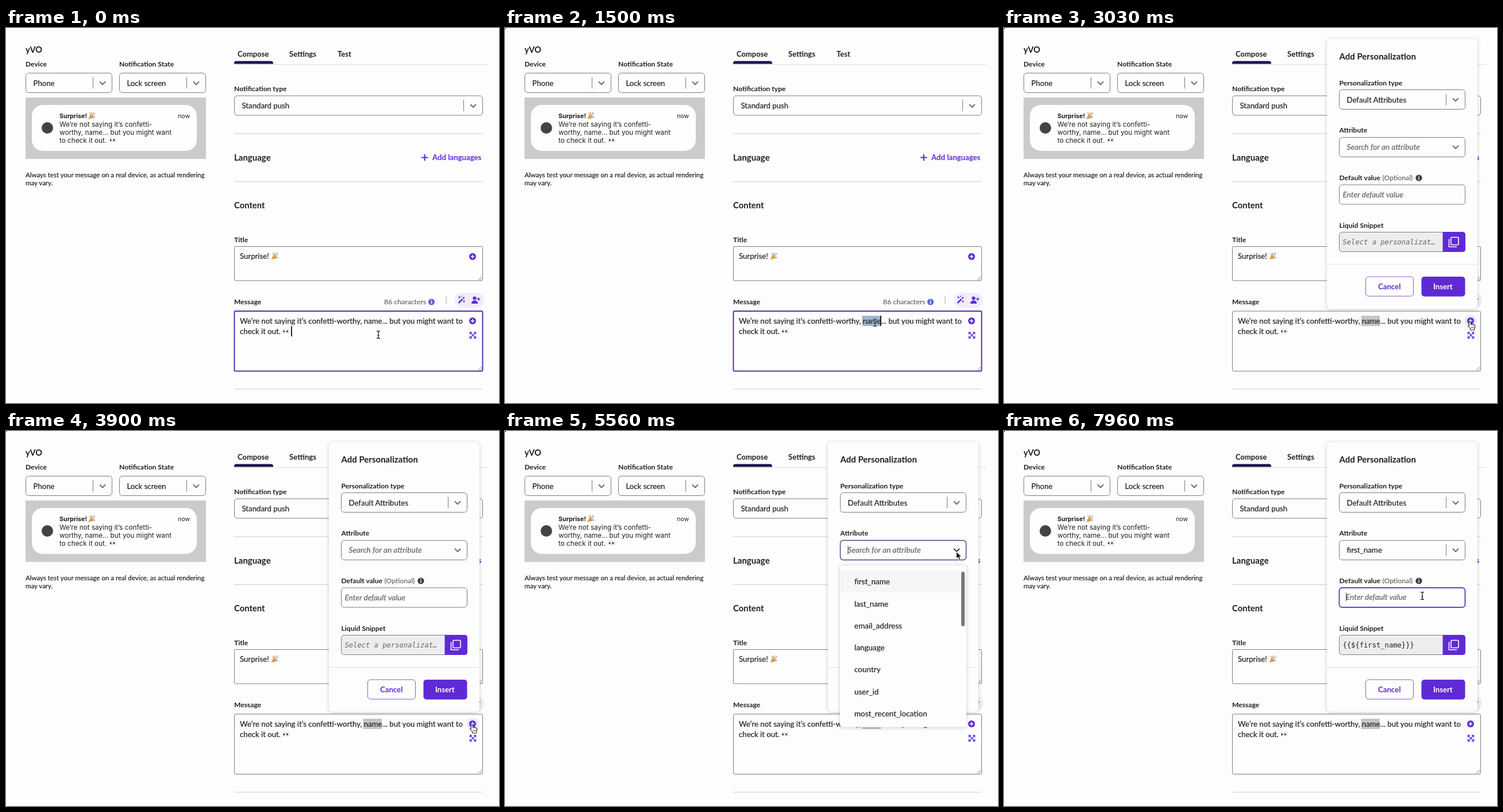
Write an HTML page that moves like this. It is 858 by 653 pixels and loops after 8000 ms.

```html
<!DOCTYPE html>
<html lang="en">
<head>
<meta charset="utf-8">
<title>Add personalization</title>
<style>
  html, body { margin: 0; width: 100%; height: 100%; overflow: hidden; background: #fdfdfd; }
  svg { display: block; width: 858px; height: 653px; font-family: Lato, sans-serif; }
  text { fill: #1f1f22; stroke: #1f1f22; stroke-width: .2; white-space: pre; }
  .b { font-weight: 700; stroke: none; }
  .i { font-style: italic; fill: #66666a; stroke: #66666a; }
  .soft { fill: #66666a; stroke: #66666a; }
  .accent { fill: #5f2ad6; }
  .sys { font-family: Inter, sans-serif; stroke: none; }
  .mono { font-family: "DejaVu Sans Mono", monospace; stroke: none; }
  .card { filter: drop-shadow(0 1px 3px rgba(0, 0, 0, .2)); }
</style>
</head>
<body>
<svg id="stage" viewBox="0 0 858 653"></svg>
<script>
const PURPLE = '#5f2ad6', GRAY = '#7c7c80', LOOP = 8000;

// Drawing helpers: text y is the visual middle of the line
const text = (x, y, s, size = 13.2, attrs = '') =>
  `<text x="${x}" y="${y + size * .35}" font-size="${size}" ${attrs}>${s}</text>`;
const bold = (x, y, s, size = 12.1, kind = '') => text(x, y, s, size, `class="b ${kind}"`);
const box = (x, y, w, h, r = 5, fill = '#fdfdfd', stroke = GRAY, attrs = '') =>
  `<rect x="${x}" y="${y}" width="${w}" height="${h}" rx="${r}" fill="${fill}" stroke="${stroke}" ${attrs}/>`;
const path = (d, stroke, width = 1, attrs = '') =>
  `<path d="${d}" fill="none" stroke="${stroke}" stroke-width="${width}" ${attrs}/>`;
const dot = (x, y, r, fill, attrs = '') => `<circle cx="${x}" cy="${y}" r="${r}" fill="${fill}" ${attrs}/>`;
const group = (id, body) => `<g id="${id}">${body}</g>`;
const chevron = (x, y, id = '') =>
  path(`M${x - 4.5} ${y - 2.2}l4.5 4.6 4.5 -4.6`, '#606065', 1.8, `stroke-linecap="round" ${id && `id="${id}"`}`);
const select = (x, y, w, value) => box(x, y, w, 34) + text(x + 13, y + 17.5, value) +
  path(`M${x + w - 33} ${y + 7}v20`, GRAY) + chevron(x + w - 16.5, y + 17.5);
const rule = y => path(`M397 ${y}H829.5`, '#cdcdd0');
const grip = (x, y) => path(`M${x - 7} ${y - 1}l6 -6M${x - 3.5} ${y - 1}l2.5 -2.5`, '#77777a', .9);
const plus = (x, y, id) => group(id, dot(x, y, 6, PURPLE) +
  path(`M${x - 3.2} ${y}h6.4M${x} ${y - 3.2}v6.4`, '#fff', 1.5));
const info = (x, y, fill) => dot(x, y, 5.6, fill) +
  path(`M${x} ${y - 3.4}v1.6M${x} ${y - .8}v4`, '#fff', 1.6);

const popper = (x, y) => `<g transform="translate(${x} ${y})">
  <path d="M-6 6L-2-3Q3-1 4 3Z" fill="#e3b052"/>
  ${path('M-4 2l4 3M-3 -1l6 5', '#a97a3c', .9)}
  ${path('M-1 -2q0 -3 2 -4M2 0q0 -3 4 -4', '#b56a77', 1.2)}
  ${path('M3 2q2 -1 3 1', '#6c8fb5', 1.2)}
  ${dot(-3, -5, .9, '#d08a5a')}${dot(4, -5.5, .9, '#7d9d60')}${dot(1, -3, .8, '#c7a24a')}</g>`;
const eyes = (x, y) => [-2.9, 2.9].map(d =>
  `<ellipse cx="${x + d}" cy="${y}" rx="2.6" ry="3.7" fill="#f3f3f3" stroke="#c6c6c6" stroke-width=".7"/>` +
  `<ellipse cx="${x + d - .9}" cy="${y + .3}" rx="1.3" ry="1.8" fill="#333"/>`).join('');

const preview =
  bold(34, 37.5, 'yVO', 14.6) + bold(34, 62.5, 'Device') + bold(197, 62.5, 'Notification State') +
  select(34.5, 78.5, 150, 'Phone') + select(197.5, 78.5, 150, 'Lock screen') +
  '<rect x="34" y="121" width="314" height="107" fill="#cbcbcd"/>' +
  '<rect x="45" y="134" width="287" height="80" rx="19" fill="#fefefe"/>' +
  dot(72, 174, 10, '#434347') +
  text(93, 153.5, 'Surprise!', 10.7, 'class="sys b"') + popper(149, 153) +
  text(299, 153.5, 'now', 10.6, 'class="sys"') +
  ['We’re not saying it’s confetti-', 'worthy, name... but you might want', 'to check it out.']
    .map((s, i) => text(93, 167.5 + 14 * i, s, 11.75, 'class="sys"')).join('') + eyes(186, 195) +
  text(34, 256, 'Always test your message on a real device, as actual rendering', 11.5) +
  text(34, 269.5, 'may vary.', 11.5);

const tools =
  '<rect x="781" y="461" width="51" height="26" rx="13" fill="#f1ecfb"/>' +
  path('M787.500 479l7 -7M795.500 471l2 -2', PURPLE, 2.6) +
  path('M789 467v4M787 469h4M793 466v2.600M797 474v4M795 476h4', PURPLE, 1.1) +
  dot(815.5, 470.5, 3.1, PURPLE) + `<path d="M810 480q0-5.500 5.500-5.500t5.500 5.500z" fill="${PURPLE}"/>` +
  path('M822.500 469v6M819.500 472h6', PURPLE, 1.4);
const expand = path('M808 530.500l9 9M817 530.500l-9 9', PURPLE, 1.3) +
  path('M807.500 533.500v-3.500h3.500M814 530h3.500v3.500M817.500 536.500v3.500h-3.500M811 540h-3.500v-3.500', PURPLE, 1.5);

const form =
  bold(403, 45.5, 'Compose', 13) + bold(493, 45.5, 'Settings', 13.2) + bold(577, 45.5, 'Test', 13) +
  path('M397 63.500H839', '#e0e0e3') + '<path d="M397 62.500v-1q0-4 4-4h60q4 0 4 4v1z" fill="#24124f"/>' +
  bold(397, 105.5, 'Notification type') + select(397.5, 118, 432, 'Standard push') + rule(184) +
  bold(397, 226, 'Language', 15) + path('M723 225.500h11.500M728.700 219.700v11.500', PURPLE, 2.1) +
  bold(742, 225.5, 'Add languages', 13.2, 'accent') + rule(267.5) +
  bold(397, 309, 'Content', 14.8) + bold(397, 368.5, 'Title') +
  box(397.5, 380.5, 432, 59.5, 2) + text(407, 397.5, 'Surprise!') + popper(467.5, 397.5) +
  plus(812, 398, 'titlePlus') + grip(829, 440) +
  bold(397, 477, 'Message') + text(658, 477, '86 characters', 12.3, 'class="soft"') +
  info(740.5, 477, '#5b66d0') + path('M766 466v15', '#aaaab0') + tools +
  box(397.5, 493, 432, 104.5, 2, '#fdfdfd', GRAY, 'id="message"') +
  '<rect id="selection" x="621.500" y="501" width="32.500" height="18"/>' +
  text(407, 510, 'We’re not saying it’s confetti-worthy, name... but you might want to') +
  text(407, 528, 'check it out.') + eyes(487.5, 528) + grip(829, 597) +
  dot(812, 510, 10.5, '#ece6f9', 'id="halo"') + plus(812, 510, 'messagePlus') + expand +
  '<rect id="caret" width="1.800" height="18" fill="#111"/>' + rule(629);

const modal = group('modal',
  box(562, 19, 262, 470, 6, '#fdfdfd', 'none', 'class="card"') +
  bold(583.5, 49.5, 'Add Personalization', 15) +
  bold(583.5, 95.5, 'Personalization type') + select(583.5, 107.5, 219, 'Default Attributes') +
  bold(583.5, 178, 'Attribute') +
  box(583.5, 190.5, 219, 34, 5, '#fdfdfd', GRAY, 'id="attribute"') +
  text(596.5, 207.5, 'Search for an attribute', 13.7, 'class="i" id="attributeHint"') +
  group('attributeValue', text(596.5, 207.5, 'first_name', 13.4) + path('M769.500 197.500v20', GRAY)) +
  chevron(786, 207.5, 'attributeChevron') +
  bold(583.5, 261, 'Default value') + text(658.5, 261, '(Optional)', 12.2, 'class="soft"') +
  info(722, 261, '#3b3b40') +
  box(583.5, 273, 219, 34, 5, '#fdfdfd', GRAY, 'id="fallback"') +
  text(0, 0, 'Enter default value', 13.6, 'class="i" id="fallbackHint"') +
  '<rect id="fieldCaret" width="1" height="15" fill="#444"/>' +
  bold(583.5, 343.5, 'Liquid Snippet') +
  box(583.5, 355.5, 215, 34, 5, '#ededee') +
  text(589.5, 373, 'Select a personalizat…', 12.15, 'class="mono i" id="snippetHint"') +
  text(589.5, 373, '{{${first_name}}}', 12.15, 'class="mono" id="snippet"') +
  `<path d="M763.500 355h34.500q5 0 5 5v25q0 5-5 5h-34.500z" fill="${PURPLE}"/>` +
  box(778, 364.5, 13, 13, 1, 'none', '#fff', 'stroke-width="1.600"') +
  path('M774.500 367.500v13.500h13.500', '#fff', 1.6) +
  path('M562 411.500H824', '#e3e3e6') +
  box(629.5, 433, 83, 34, 5, '#fdfdfd', '#8263c2') + bold(651, 450.5, 'Cancel', 13.2, 'accent') +
  box(726.5, 433, 76, 34.5, 5, PURPLE, 'none') +
  text(747, 450.5, 'Insert', 13.1, 'class="b" style="fill:#fff"'));

const options = ['first_name', 'last_name', 'email_address', 'language', 'country', 'user_id', 'most_recent_location'];
const dropdown = group('dropdown',
  box(583, 234, 220, 281.5, 4, '#fdfdfd', 'none', 'class="card"') +
  '<rect x="584" y="243" width="209" height="38.500" fill="#f6f6f7"/>' +
  options.map((s, i) => text(608, 262.5 + 38.3 * i, s, 13.5)).join('') +
  '<rect x="794" y="245" width="6" height="95" rx="3" fill="#77777a"/>');

const cursors =
  group('ibeam', ['#fff', '#222'].map((c, i) => path(
    'M-3 -6.500q3 0 3 2v9q0 2 -3 2M3 -6.500q-3 0 -3 2v9q0 2 3 2M-1.500 1.500h3', c, i ? 1.3 : 2.6)).join('')) +
  group('arrow', '<path d="M0 0V12.500L2.900 9.800 5 14.500 7.300 13.500 5.200 9H9Z" fill="#111" stroke="#fff" stroke-width=".9"/>') +
  group('hand', `<path d="M-1.500 1q1.500-2 3 0V5q2-1 2.500.5 2-.7 2.500.6 2-.4 2.200 1V10L7.500 13V15H1V13L-3 8.500q-.8-2 1.500-1.300Z"
    fill="#fff" stroke="#222" stroke-width="1.100"/>` + path('M2.500 9v3M4.500 9v3M6.300 9v3', '#222', .7));

const stage = document.getElementById('stage');
stage.innerHTML = preview + form + modal + dropdown + cursors +
  '<rect id="corner" width="1.500" height="1.500" fill="#222"/>';
const el = id => document.getElementById(id);
const show = (id, on) => el(id).setAttribute('visibility', on ? 'visible' : 'hidden');
const set = (id, attrs) => { for (const k in attrs) el(id).setAttribute(k, attrs[k]); };

const ease = {
  both: u => u * u * (3 - 2 * u),
  in: u => u * u,
  out: u => u * (2 - u)
};
// Pointer stops: time, x, y, easing of the move that ends there
const route = [
  [0, 648, 534], [250, 648, 534, 'both'], [900, 644, 513, 'both'], [1750, 644, 513, 'both'],
  [2450, 811, 511, 'both'], [4450, 811, 511, 'both'], [4830, 820, 349, 'in'], [5300, 785.5, 210, 'out'],
  [5800, 785.5, 210, 'both'], [6400, 742, 258, 'both'], [7050, 742, 258, 'both'],
  [7500, 728, 287, 'both'], [LOOP, 728, 287, 'both']
];
function pointerAt(t) {
  const i = route.findIndex(stop => stop[0] > t);
  const [t0, x0, y0] = route[i - 1], [t1, x1, y1, kind] = route[i];
  const u = ease[kind]((t - t0) / (t1 - t0));
  return [x0 + (x1 - x0) * u, y0 + (y1 - y0) * u];
}

const SELECT = 1200, OPEN = 2700, LIST = 5450, PICK = 6750, FOCUS = 7650;

function render(t) {
  const [x, y] = pointerAt(t);
  const selected = t >= SELECT, open = t >= OPEN, listed = t >= LIST && t < PICK;
  const picked = t >= PICK, typing = t >= FOCUS;
  show('corner', t >= 30);

  set('message', open ? { stroke: GRAY, 'stroke-width': 1 } : { stroke: '#5930ad', 'stroke-width': 2 });
  show('selection', selected);
  set('selection', { fill: open ? '#c3c6c8' : '#9ab7d2' });
  show('caret', !open && (selected ? (t - SELECT) % 1000 < 500 : t % 1000 < 500));
  set('caret', selected ? { x: 653, y: 501 } : { x: 496, y: 519 });
  const onPlus = t > 2300 && Math.hypot(x - 812, y - 510) < 12;
  show('halo', onPlus);
  set('messagePlus', { opacity: t > 4500 && t < 5050 ? .72 : 1 });

  show('modal', open);
  show('dropdown', listed);
  const attributeFocus = t >= LIST && !typing;
  const opening = t < LIST + 160;
  set('attribute', attributeFocus
    ? { stroke: opening ? '#4c3e86' : '#6a42c8', 'stroke-width': opening ? 1.4 : 2 }
    : { stroke: GRAY, 'stroke-width': 1 });
  set('attributeChevron', { stroke: attributeFocus ? '#2b2b30' : '#606065' });
  show('attributeHint', open && !picked);
  show('attributeValue', picked);
  show('snippetHint', open && !picked);
  show('snippet', picked);

  set('fallback', typing ? { stroke: '#6a42c8', 'stroke-width': 2 }
    : { stroke: picked ? '#3c3c42' : GRAY, 'stroke-width': picked ? 1.3 : 1 });
  set('fallbackHint', { x: typing ? 595 : 589.5, y: typing ? 294 : 295 });
  show('fieldCaret', listed && (t - LIST) % 1000 < 500 || typing);
  set('fieldCaret', typing ? { x: 595, y: 281.5 } : { x: 596.5, y: 200 });

  const kind = onPlus ? 'hand' : t < 2450 || y > 273 && t > PICK ? 'ibeam' : 'arrow';
  for (const id of ['ibeam', 'arrow', 'hand']) show(id, id === kind);
  set(kind, { transform: `translate(${x} ${y})` });
}

const start = performance.now();
function tick() {
  render((performance.now() - start) % LOOP);
  requestAnimationFrame(tick);
}
tick();
</script>
</body>
</html>
```
